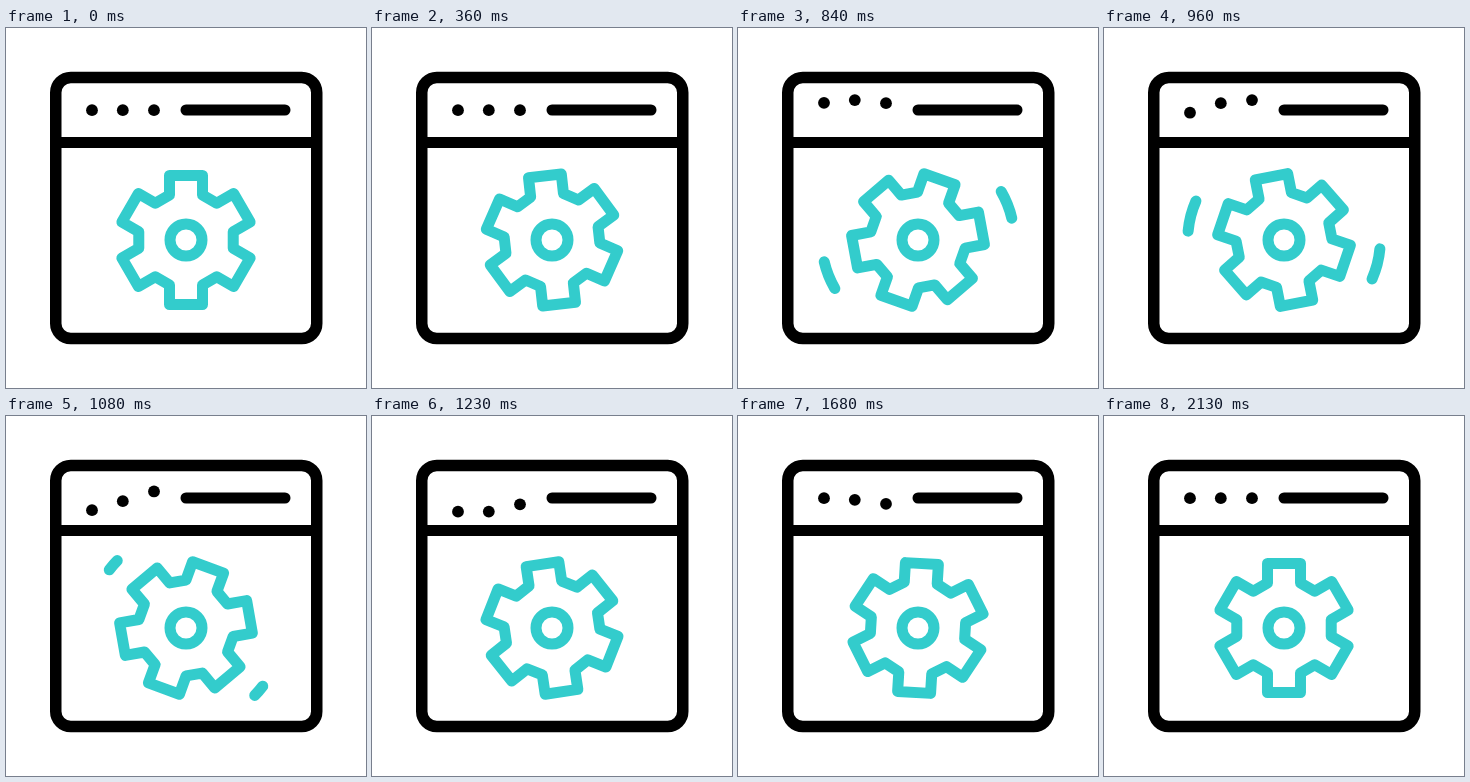
Write an HTML page that moves like this. It is 360x360 px and loops after 2.16 s.

```html
<!DOCTYPE html>
<html lang="en">
<head>
<meta charset="utf-8">
<title>Browser settings</title>
<style>
  html, body { margin: 0; height: 100%; overflow: hidden; background: #fff; }
  svg { display: block; width: 100vw; height: 100vh; }
  .line { fill: none; stroke: #000; stroke-width: 11.5; stroke-linecap: round; stroke-linejoin: round; }
  .teal { stroke: #3cc; stroke-width: 11; }
</style>
</head>
<body>
<svg viewBox="0 0 360 360">
  <g class="line">
    <rect x="49.75" y="49.5" width="261" height="261" rx="15"/>
    <path d="M50 114.5H310" stroke-width="11"/>
    <path d="M180 82H279" stroke-width="11"/>
  </g>
  <g id="dots"></g>
  <g class="line teal" transform="translate(180 212)">
    <path id="gear"/>
    <circle r="16"/>
    <path id="trail"/>
  </g>
</svg>
<script>
const LOOP = 2160;
const $ = id => document.getElementById(id);
const gear = $('gear'), trail = $('trail');

const ease = u => (1 - Math.cos(Math.PI * Math.min(1, Math.max(0, u)))) / 2;

// Eased value at time t through [time, value] keys
function track(keys, t) {
  let value = keys[0][1];
  for (let i = 1; i < keys.length; i++) {
    const [t0, a] = keys[i - 1], [t1, b] = keys[i];
    value += (b - a) * ease((t - t0) / (t1 - t0));
  }
  return value;
}

// Six teeth, each four corners
const corners = [];
for (let k = 0; k < 6; k++) {
  const c = Math.cos(k * Math.PI / 3), s = Math.sin(k * Math.PI / 3);
  for (const [x, y] of [[-16.5, -45], [-16.5, -64.5], [16.5, -64.5], [16.5, -45]])
    corners.push([x * c - y * s, x * s + y * c].map(n => n.toFixed(2)));
}
gear.setAttribute('d', 'M' + corners.join('L') + 'Z');

const dots = [86, 116.8, 148].map(x => {
  const dot = document.createElementNS('http://www.w3.org/2000/svg', 'circle');
  dot.setAttribute('cx', x);
  dot.setAttribute('r', 5.9);
  return $('dots').appendChild(dot);
});

const spin = [[0, 0], [595, -9.5], [1395, 125], [LOOP, 120]];
const bounce = [[380, 82.2], [750, 72], [1160, 96.3], [1680, 82.2]];
const DOT_DELAY = 115;

function arc(from, to) {
  const r = 96.3;
  const point = deg => {
    const a = deg * Math.PI / 180;
    return `${r * Math.cos(a)} ${r * Math.sin(a)}`;
  };
  return `M${point(from)}A${r} ${r} 0 0 1 ${point(to)}`;
}

function draw(now) {
  const t = now % LOOP;
  gear.setAttribute('transform', `rotate(${track(spin, t)})`);
  dots.forEach((dot, i) => dot.setAttribute('cy', track(bounce, t - i * DOT_DELAY)));

  const head = track([[662, -45], [1103, 45]], t);
  const tail = track([[724, -45], [1165, 45]], t);
  trail.setAttribute('d', head - tail > 0.1 ? arc(tail, head) + arc(tail + 180, head + 180) : '');
}

const start = performance.now();
function frame() {
  draw(performance.now() - start);
  requestAnimationFrame(frame);
}
frame();
</script>
</body>
</html>
```
